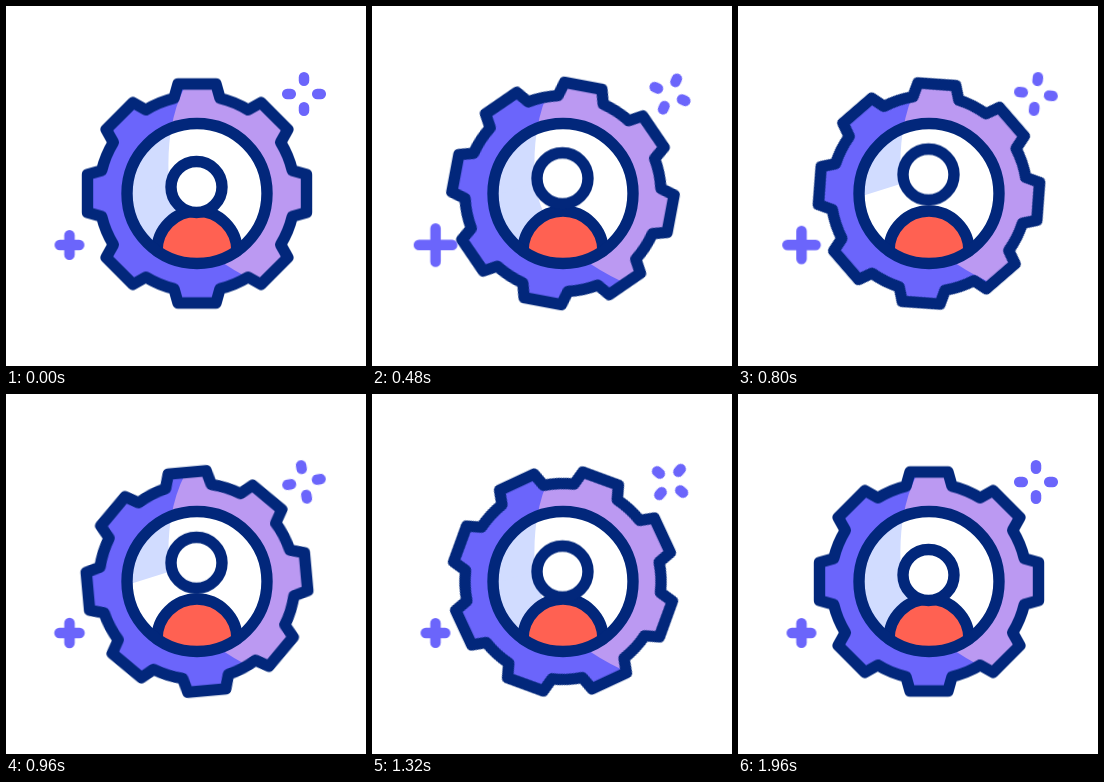
An HTML page for the animation above (2000 ms loop, 360 by 360 pixels).

```html
<!DOCTYPE html>
<html lang="en">
<head>
<meta charset="utf-8">
<title>Profile settings</title>
<style>
  html, body { margin: 0; width: 100%; height: 100%; overflow: hidden; background: #fff; }
  svg { display: block; width: 100vw; height: 100vh; }

  .line { fill: none; stroke: #02277b; stroke-width: 11.4; stroke-linecap: round; stroke-linejoin: round; }
  .accent { fill: none; stroke: #6b65fb; stroke-width: 10.5; stroke-linecap: round; }
  .plus { vector-effect: non-scaling-stroke; }

  .gear, .spark, .head, .plus { animation: 2s cubic-bezier(.65, 0, .35, 1) infinite; }
  .gear { animation-name: turn; }
  .spark { animation-name: spin; }
  .head { animation-name: bob; }
  .plus { animation-name: grow; }
  .shade-low { animation: hide 2s step-end infinite; }

  /* cubic ease in, then cubic ease out */
  @keyframes turn {
    from { transform: rotate(0deg); animation-timing-function: cubic-bezier(.333, 0, .667, 0); }
    49% { transform: rotate(90deg); animation-timing-function: cubic-bezier(.333, 1, .667, 1); }
    98%, to { transform: rotate(180deg); }
  }
  @keyframes spin { from { transform: rotate(0deg); } 98%, to { transform: rotate(360deg); } }
  @keyframes bob {
    0%, 83%, 100% { transform: translateY(0); }
    42% { transform: translateY(-12.5px); }
  }
  @keyframes grow {
    0%, 53%, 100% { transform: scale(1); }
    29% { transform: scale(1.74); }
  }
  @keyframes hide { 0%, 56% { opacity: 1; } 28% { opacity: 0; } }
</style>
</head>
<body>
<svg viewBox="0 0 360 360">
  <defs>
    <path id="gear"/>
    <clipPath id="wedge">
      <path d="M185 70Q161 107 162.5 165Q163 239 262 281V330H50V70Z"/>
    </clipPath>
  </defs>

  <!-- gear body, with a fixed two-tone split -->
  <g transform="translate(191 187.5)"><use href="#gear" class="gear" fill="#bb99f2"/></g>
  <g clip-path="url(#wedge)">
    <g transform="translate(191 187.5)"><use href="#gear" class="gear" fill="#6b65fb"/></g>
  </g>
  <g transform="translate(191 187.5)"><use href="#gear" class="gear line"/></g>

  <!-- window -->
  <circle cx="191" cy="187.5" r="70" fill="#fff"/>
  <g clip-path="url(#wedge)" fill="#d1dcff">
    <path d="M121 187.5A70 70 0 0 1 191 117.5V169L121 191Z"/>
    <path class="shade-low" d="M121 187.5A70 70 0 0 0 151 245L191 206V168L121 190Z"/>
  </g>

  <!-- person -->
  <path d="M151 245A40 40 0 0 1 231 245A70 70 0 0 1 151 245Z" fill="#ff6152"/>
  <path class="line" d="M151 245A40 40 0 0 1 231 245"/>
  <g class="head">
    <circle cx="190.5" cy="181" r="25.5" fill="#fff"/>
    <circle class="line" cx="190.5" cy="181" r="25.5"/>
  </g>
  <circle class="line" cx="191" cy="187.5" r="70"/>

  <!-- accents -->
  <g transform="translate(298 88)">
    <path class="accent spark" d="M0-13.2V-16.8M0 13.2V16.8M-13.2 0H-16.8M13.2 0H16.8"/>
  </g>
  <g transform="translate(63.5 239)">
    <path class="accent plus" d="M-9.7 0H9.7M0-9.7V9.7"/>
  </g>
</svg>
<script>
  const TEETH = 8, RADIUS = 98;
  const tooth = [[-23, -95.3], [-19, -109.5], [19, -109.5], [23, -95.3]];

  const rotate = ([x, y], a) => {
    const c = Math.cos(a), s = Math.sin(a);
    return `${(x * c - y * s).toFixed(2)} ${(x * s + y * c).toFixed(2)}`;
  };

  let d = "";
  for (let i = 0; i < TEETH; i++) {
    const [start, ...rest] = tooth.map(p => rotate(p, i * 2 * Math.PI / TEETH));
    d += (i ? `A${RADIUS} ${RADIUS} 0 0 1 ` : "M") + start + "L" + rest.join("L");
  }
  d += `A${RADIUS} ${RADIUS} 0 0 1 ${rotate(tooth[0], 0)}Z`;
  document.getElementById("gear").setAttribute("d", d);
</script>
</body>
</html>
```
